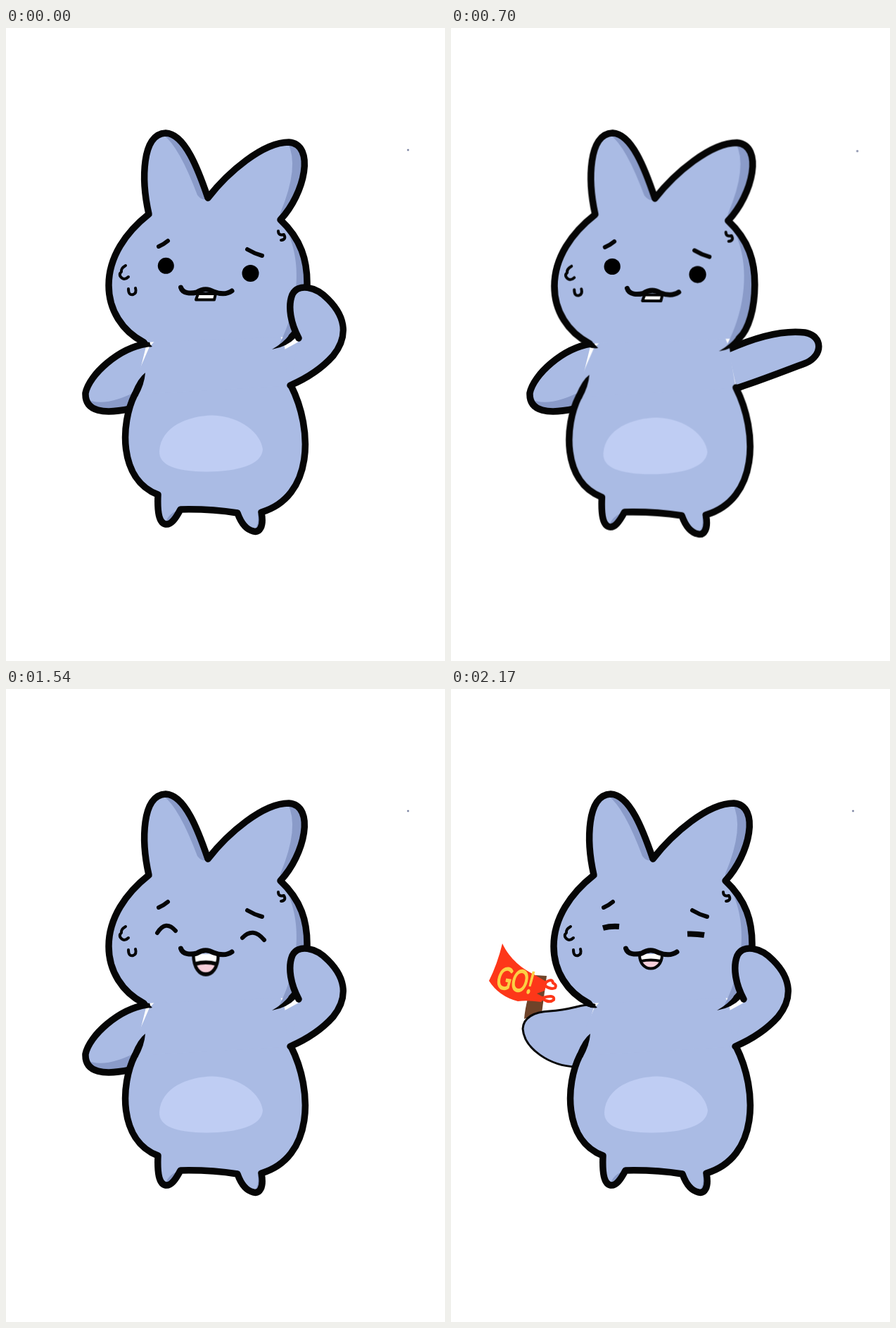
Write an HTML page without scripts that moves like this. It is 624 px wide and 898 px high and loops after 2.73 s.

```html
<!DOCTYPE html>
<html lang="en">
<head>
<meta charset="utf-8">
<title>Waving bunny</title>
<style>
html, body { margin: 0; width: 100%; height: 100%; overflow: hidden; background: #fff; }
svg { display: block; width: 100vw; height: 100vh; }

.ink { fill: none; stroke: #060606; stroke-width: 9.5; stroke-linecap: round; stroke-linejoin: round; }
.skin { fill: #aabbe4; }
.shade { fill: #8a9bc9; }
.thin { stroke-width: 3; }
.mark { stroke-width: 4; }

/* One beat is 70 ms, 39 beats per loop. */
.anim * { animation: 2730ms step-end infinite; animation-name: none; }
.anim .head-sway { animation-name: head-sway; }
.anim .trunk-sway { animation-name: trunk-sway; }
.anim .arm-sway { animation-name: arm-sway; }
.anim .hand-curl { animation-name: hand-curl; }
.anim .hand-up { animation-name: hand-up; }
.anim .hand-out { animation-name: hand-out; }
.anim .hand-level { animation-name: hand-level; }
.anim .hand-down { animation-name: hand-down; }
.anim .eyes-open { animation-name: eyes-open; }
.anim .eyes-flat { animation-name: eyes-flat; }
.anim .eyes-happy { animation-name: eyes-happy; }
.anim .laugh { animation-name: laugh; }
.anim .mouth { animation-name: mouth; }
.anim .arm-low { animation-name: arm-low; }
.anim .arm-mid { animation-name: arm-mid; }
.anim .arm-high { animation-name: arm-high; }
.anim .pole { animation-name: pole; }
.anim .cloth { animation-name: cloth; }

@keyframes head-sway {
  0%, 33.33%, 43.58% { transform: none; }
  2.56%, 30.76%, 35.89%, 41.02% { transform: matrix(1.004, 0, 0, 1.004, -.8, -1.4); }
  7.69%, 28.2%, 38.46% { transform: matrix(1.01, 0, 0, 1.01, -1.9, -3.5); }
  12.82%, 25.64% { transform: matrix(1, .004, -.0044, .9964, 3, 1.6) matrix(1.01, 0, 0, 1.01, -1.9, -3.5); }
  17.94% { transform: matrix(1, .02, -.0218, .982, 15.3, 8) matrix(1.01, 0, 0, 1.01, -1.9, -3.5); }
}
@keyframes trunk-sway {
  0%, 33.33%, 43.58% { transform: none; }
  2.56%, 30.76%, 35.89%, 41.02% { transform: matrix(1.003, 0, 0, 1.002, -1.3, 0); }
  7.69%, 28.2%, 38.46% { transform: matrix(1.008, 0, 0, 1.005, -3.4, 0); }
  12.82%, 25.64% { transform: matrix(1.006, 0, -.002, 1.004, -1.5, 1); }
  17.94% { transform: matrix(1, 0, -.01, 1, 6, 5); }
}
@keyframes arm-sway {
  0%, 33.33%, 43.58% { transform: none; }
  7.69%, 25.64%, 38.46% { transform: translate(-1px, 0); }
  17.94% { transform: translate(6.5px, 2px); }
}

@keyframes hand-curl { 0%, 33.33%, 43.58% { visibility: visible; } 2.56%, 35.89% { visibility: hidden; } }
@keyframes hand-up {
  0%, 7.69%, 33.33%, 38.46%, 43.58% { visibility: hidden; }
  2.56%, 30.76%, 35.89%, 41.02% { visibility: visible; }
}
@keyframes hand-out {
  0%, 12.82%, 30.76%, 41.02% { visibility: hidden; }
  7.69%, 28.2%, 38.46% { visibility: visible; }
}
@keyframes hand-level { 0%, 17.94%, 28.2% { visibility: hidden; } 12.82%, 25.64% { visibility: visible; } }
@keyframes hand-down { 0%, 25.64% { visibility: hidden; } 17.94% { visibility: visible; } }

@keyframes eyes-open { 0% { visibility: visible; } 46.15% { visibility: hidden; } }
@keyframes eyes-flat { 0%, 48.71% { visibility: hidden; } 46.15%, 58.97% { visibility: visible; } }
@keyframes eyes-happy { 0%, 58.97% { visibility: hidden; } 48.71% { visibility: visible; } }
@keyframes laugh { 0% { visibility: hidden; } 46.15% { visibility: visible; } }
@keyframes mouth {
  0%, 58.97% { transform: none; }
  48.71%, 56.41% { transform: translate(284px, 376px) scale(1.1, 1.4) translate(-284px, -376px); }
  51.28% { transform: translate(284px, 376px) scale(1.2, 1.8) translate(-284px, -376px); }
}

@keyframes arm-low { 0% { visibility: visible; } 61.53% { visibility: hidden; } }
@keyframes arm-mid {
  0%, 64.1%, 69.23%, 74.35% { visibility: hidden; }
  61.53%, 66.66%, 71.79%, 76.92% { visibility: visible; }
}
@keyframes arm-high {
  0%, 66.66%, 71.79%, 76.92% { visibility: hidden; }
  64.1%, 69.23%, 74.35% { visibility: visible; }
}
@keyframes pole { 0% { visibility: hidden; } 76.92% { visibility: visible; } }
@keyframes cloth { 0% { visibility: hidden; } 79.48% { visibility: visible; } }
</style>
</head>
<body>
<svg viewBox="0 0 624 898" class="anim">
  <defs>
    <path id="head" d="M196 446C165 430 146 400 146 365C146 325 170 290 203 264C192 215 193 150 227 149C254 150 273 200 287 241C315 205 365 162 402 162C440 165 425 235 390 272C420 300 428 330 428 362C428 395 420 425 406 438"/>
    <path id="trunk" d="M405 507C437 570 437 665 363 687C367 708 360 716 352 714C342 712 334 702 329 688Q290 682 248 683C240 698 234 705 227 704C217 702 215 685 216 662C159 640 163 560 183 520"/>
    <path id="low" d="M200 448C160 454 118 492 113 518C112 545 140 548 177 540"/>
    <path id="curl" d="M416 440C405 420 400 395 407 378C415 362 440 366 458 385C485 412 485 440 465 465C447 485 425 498 404 507"/>
    <path id="out" d="M394 453C422 430 447 400 470 388C495 378 505 398 499 417C492 455 460 475 430 496L404 508"/>
    <path id="shoulder" d="M418 444L396 456L400 503H410z"/>
  </defs>

  <!-- waving arm, behind the body -->
  <g class="hand-out">
    <use href="#out" class="skin"/>
    <path class="shade" d="M425 496Q482 450 492 393L501 410Q495 460 430 496z"/>
    <use href="#out" class="ink"/>
  </g>
  <path class="ink hand-level" style="fill:#aabbe4" d="M394 456C430 440 470 428 503 432C530 437 528 465 505 475C470 488 440 500 406 511"/>
  <path class="ink hand-down" style="fill:#aabbe4" d="M387 462C440 455 500 475 527 505C543 525 533 545 515 544C480 542 440 527 407 517"/>

  <!-- flag and its arm -->
  <path class="pole" fill="#6f4329" d="M120 406L136 407L129 460L104 468Q106 442 120 406z"/>
  <g class="cloth">
    <path fill="#fd3719" d="M73 361C84 384 102 397 118 405L137 416L133 428L122 432L133 438L128 444Q108 441 95 443Q68 436 54 414Q66 390 73 361z"/>
    <path fill="none" stroke="#fd3719" stroke-width="4" stroke-linecap="round" d="M132 418Q144 409 145 417Q151 420 148 424Q142 427 132 420M131 438Q148 433 146 441Q140 446 131 440"/>
    <text transform="translate(62 424) rotate(9) skewX(-6) scale(.8 1.2)" font-family="Lato, sans-serif" font-size="36" fill="#fbd145" stroke="#fbd145" stroke-width="1.5">GO!</text>
  </g>
  <g class="arm-sway">
    <g class="arm-low">
      <use href="#low" class="skin"/>
      <path class="shade" d="M113 526Q140 540 190 513L177 540Q120 552 113 526z"/>
      <use href="#low" class="ink"/>
    </g>
  </g>
  <path class="ink thin arm-mid" style="fill:#aabbe4" d="M204 448C185 446 175 455 140 457C118 458 103 466 102 482C104 510 140 535 178 536"/>
  <path class="ink thin arm-high" style="fill:#aabbe4" d="M206 450Q195 444 180 448C155 447 140 430 128 423C115 418 106 425 106 445C110 490 140 530 176 542"/>

  <g class="trunk-sway">
    <path class="skin" d="M204 452L230 425H385L396 452L405 508L400 530H185L183 500z"/>
    <use href="#trunk" class="skin"/>
    <path class="shade" d="M226 704Q230 688 248 683Q238 703 226 704z
      M352 714Q360 705 358 690H364Q367 714 352 714z"/>
    <path fill="#bfcdf3" d="M218 600C220 565 260 550 293 549.5C335 551 362 575 365 598C363 620 330 629 285 629.5C240 629 217 620 218 600z"/>
    <use href="#trunk" class="ink"/>
    <path fill="#060606" d="M198 489Q197 505 187 523L179 518Q188 496 198 489z"/>
  </g>

  <g class="head-sway">
    <use href="#head" class="skin"/>
    <path class="shade" d="M224 152Q246 168 272 237Q280 247 287 241C273 200 254 150 227 149z
      M400 162Q418 195 390 262V272C425 235 440 165 402 162z
      M390 272C418 310 424 380 388 450L405 439C420 425 428 395 428 362C428 330 420 300 390 272z"/>
    <use href="#head" class="ink"/>
    <path fill="#060606" d="M198 442L208 452Q200 454 192 449z
      M378 456Q400 452 412 439L403 435Q394 447 378 456z"/>
    <circle cx="571.5" cy="173" r="1.5" fill="#8088a5"/>

    <path class="ink" style="stroke-width:6" d="M217 310Q224 307 230 302M343 314Q353 320 364 323"/>
    <path class="ink mark" d="M170 337Q163 341 164 346Q160 349 163 353Q168 359 174 353M174 370Q174 380 181 378Q186 376 184 369M387 288Q387 295 395 293Q399 300 391 301"/>
    <g class="eyes-open">
      <circle cx="227.3" cy="337.3" r="11.5"/>
      <circle cx="347.5" cy="348" r="12"/>
      <path class="ink mark" style="fill:#fff" d="M273 377L270 385.500H296L298 377z"/>
    </g>
    <path class="ink eyes-flat" style="stroke-width:8;stroke-linecap:butt" d="M216 339Q227 336 239 337M336 347.500Q348 347 360 349"/>
    <path class="ink eyes-happy" style="stroke-width:6" d="M215 346Q227 327 241 343M336 353Q351 337 367 356"/>
    <g class="laugh">
      <g class="mouth">
        <path fill="#fff" d="M268 376H300V386H269z"/>
        <path fill="#f6cfda" d="M269 386H299Q295 397 284 397Q273 397 269 386z"/>
        <path class="ink mark" d="M268 377C268 403 300 403 300 377M270 386Q284 383 298 386"/>
      </g>
    </g>
    <path class="ink" style="stroke-width:7" d="M248.500 368C251 377 263 377 271 375Q283 367 295 374Q311 380 321 373"/>
  </g>

  <!-- waving arm, in front of the head -->
  <g class="hand-up">
    <use href="#shoulder" class="skin"/>
    <path class="ink" style="fill:#aabbe4" d="M410 440C408 415 420 385 440 374C465 362 485 385 488 405C490 440 465 470 404 507"/>
  </g>
  <g class="hand-curl">
    <use href="#shoulder" class="skin"/>
    <use href="#curl" class="skin"/>
    <path class="shade" d="M404 503Q452 484 478 445Q472 478 404 507z"/>
    <use href="#curl" class="ink"/>
  </g>
</svg>
</body>
</html>
```
